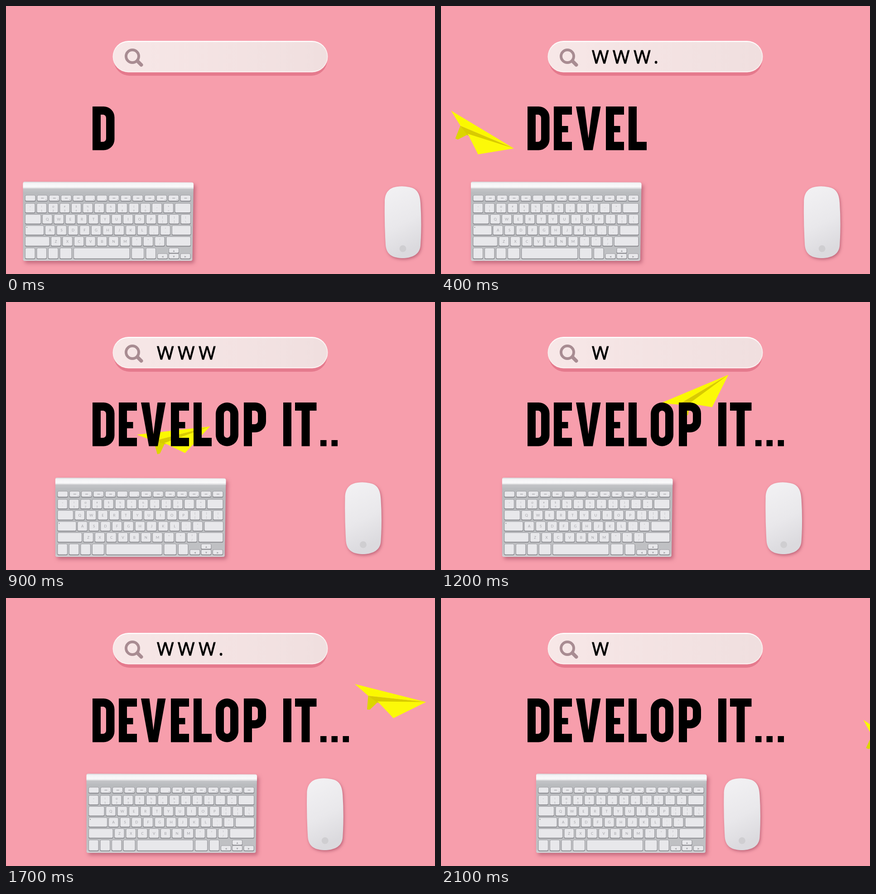
These frames come from a looping animation (947 px wide and 592 px high, 2200 ms). An HTML page:

```html
<!DOCTYPE html>
<html lang="en">
<head>
<meta charset="utf-8">
<title>Develop it</title>
<style>
  html, body { margin: 0; height: 100%; overflow: hidden; background: #f79eac; }
  svg { display: block; width: 100vw; height: 100vh; }
  #url { font: 40.5px "Open Sans", "Noto Sans", sans-serif; letter-spacing: 8.6px; stroke: #000; }
  #keyboard text { font: 8px Lato, "Open Sans", sans-serif; fill: #a3a3a8; text-anchor: middle; }
  #keyboard text.small { font-size: 6px; }
  #keyboard .key { fill: #e8e8eb; stroke: #97979c; stroke-width: .9; }
  #keyboard .under { fill: #838388; }
  #keyboard { filter: drop-shadow(4px 5px 4px rgba(140, 50, 75, .5)); }
  #mouse { filter: drop-shadow(2px 3px 3px rgba(140, 50, 75, .5)); }
</style>
</head>
<body>
<svg viewBox="0 0 947 592">
  <defs>
    <linearGradient id="pill">
      <stop stop-color="#f7e7e7"/><stop offset="1" stop-color="#f0dfdf"/>
    </linearGradient>
    <linearGradient id="rim" x2="0" y2="1">
      <stop stop-color="#fff"/><stop offset=".3" stop-color="#faeeee"/>
      <stop offset=".85" stop-color="#f8eaea"/><stop offset="1" stop-color="#fdf0f0"/>
    </linearGradient>
    <linearGradient id="body" x2="0" y2="1">
      <stop stop-color="#cfd0d3"/><stop offset=".12" stop-color="#b9bbbe"/>
      <stop offset=".95" stop-color="#c0c1c4"/><stop offset="1" stop-color="#d4d4d7"/>
    </linearGradient>
    <linearGradient id="roll" x2="0" y2="1">
      <stop stop-color="#d3d2d5"/><stop offset=".2" stop-color="#f3f3f5"/>
      <stop offset=".7" stop-color="#fafafb"/><stop offset="1" stop-color="#d4d4d7"/>
    </linearGradient>
    <linearGradient id="shell" x2=".25" y2="1">
      <stop stop-color="#f3f2f4"/><stop offset=".6" stop-color="#e9e8eb"/><stop offset="1" stop-color="#dbdade"/>
    </linearGradient>
  </defs>

  <rect x="238" y="84" width="471" height="70" rx="35" fill="#e57a8d"/>
  <rect x="235.5" y="77" width="475" height="69.5" rx="34.7" fill="url(#rim)"/>
  <rect x="237.5" y="79.5" width="471" height="64.5" rx="32.2" fill="url(#pill)"/>
  <g fill="none" stroke="#a88c92">
    <circle cx="279" cy="111" r="14" stroke-width="6"/>
    <path d="M290.5 122l8 8" stroke-width="8" stroke-linecap="round"/>
  </g>
  <text id="url" x="333" y="126.5"></text>

  <g id="plane">
    <path d="M35 18L61 23 46 47 40 48z" fill="#ddd500"/>
    <path d="M59 22L162 0 101 52z" fill="#fcf908"/>
    <path d="M35 18L162 0 60 28z" fill="#d8cb00"/>
    <path d="M0 0L162 0 35 18z" fill="#fbf800"/>
    <path d="M58 25L162 0 101 52z" fill="#fcf908"/>
  </g>
  <g id="title" role="img" aria-label="DEVELOP IT..." fill-rule="evenodd"></g>

  <g id="keyboard">
    <path d="M0 5H376.500L374 171q0 4-4 4H4q-4 0-4-4z" fill="url(#body)"/>
    <path d="M0 15V4q0-4 4-4L372 1.500q4.500 0 4.500 4V16z" fill="url(#roll)"/>
  </g>
  <g id="mouse">
    <path d="M0 35C0 14 10 3 28 1Q40-1 54 2C71 5 78 16 79 38Q82 85 79 130C78 150 62 158 42 159C18 159 4 152 2 130Q-1 80 0 35Z" fill="url(#shell)"/>
    <circle cx="40" cy="138" r="7.500" fill="#cfced1"/>
  </g>
</svg>
<script>
const $ = id => document.getElementById(id);

function add(parent, tag, attrs, text = '') {
  const el = document.createElementNS('http://www.w3.org/2000/svg', tag);
  for (const name in attrs) el.setAttribute(name, attrs[name]);
  el.textContent = text;
  return parent.appendChild(el);
}

// Headline letters
const letterE = x => `M${x} 222h40v18h-22v25h13.500v14h-13.500v21h22v18.500h-40z`;
const dot = x => `M${x} 305h13.500v13.500h-13.500z`;
const letters = [
  'M191 222h24.500a24 24 0 0 1 24 24v48.500a24 24 0 0 1-24 24h-24.500zM209 240v60h5a7 7 0 0 0 7-7v-46a7 7 0 0 0-7-7z',
  letterE(249),
  'M298 222h18.500l9 70 9-70h18l-17.500 96.500h-19.500z',
  letterE(364),
  'M414 222h18v78h22v18.500h-40z',
  'M463 247a25 25 0 0 1 50 0v46.500a25 25 0 0 1-50 0zM481 247v46a7 7 0 0 0 14 0v-46a7 7 0 0 0-14 0z',
  'M525 222h25a24 24 0 0 1 24 24v18a24 24 0 0 1-24 24h-7v30.500h-18zM543 240v30h6a7 7 0 0 0 7-7v-16a7 7 0 0 0-7-7z',
  'M612 222h18v96.500h-18z',
  'M638 222h47.500v18h-15v78.500h-18v-78.500h-14.500z',
  dot(694), dot(718.5), dot(743.5)
].map(d => add($('title'), 'path', { d }));

// Keyboard, in coordinates relative to its top left corner
function key(x, y, width, height, label = '', shifted = '') {
  const board = $('keyboard'), mid = x + width / 2;
  add(board, 'rect', { class: 'under', x: x - .5, y: y + .5, width: width + 1, height: height + 1, rx: 3 });
  add(board, 'rect', { class: 'key', x, y, width, height, rx: 2.7 });
  if (shifted) {
    add(board, 'text', { class: 'small', x: mid, y: y + 8.5 }, shifted);
    add(board, 'text', { class: 'small', x: mid, y: y + 17.5 }, label);
  } else if (label) add(board, 'text', { x: mid, y: y + height / 2 + 3 }, label);
}

function row(y, x, labels, shifted = '') {
  const skip = labels.length - shifted.length;
  [...labels].forEach((c, i) => key(x + i * 25.45, y, 21.5, 20.5, c, shifted[i - skip]));
}

for (let i = 0; i < 14; i++) {
  const x = 5 + i * 26.35;
  key(x, 30, 22.5, 12.5);
  if (i && i != 5 && i != 6) add($('keyboard'), 'rect', { x: x + 8.5, y: 35.5, width: 6, height: 2, fill: '#b9b9bd' });
  if (i && i < 13) add($('keyboard'), 'rect', { x: x + 18.5, y: 39, width: 1.5, height: 1.5, fill: '#aaaaae' });
}
row(48, 5, '`1234567890-=', '~!@#$%^&*()_+');
key(335.5, 48, 34.5, 20.5);
key(5, 72.5, 34.5, 20.5);
row(72.5, 43, 'QWERTYUIOP[]\\', '{}|');
key(5, 97, 41, 20.5);
row(97, 49, "ASDFGHJKL;'", ':"');
key(329, 97, 41.5, 20.5);
key(5, 121.5, 53.5, 20.5);
row(121.5, 62, 'ZXCVBNM,./', '<>?');
key(316.5, 121.5, 53.5, 20.5);
add($('keyboard'), 'circle', { cx: 8.5, cy: 101, r: .9, fill: '#777' });
for (const [x, w] of [[5, 21.5], [30.5, 21.5], [56, 21.5], [81.5, 26], [112, 123.5], [240, 27], [271.5, 21.5]])
  key(x, 146.5, w, 23.5);
for (const [x, y, label] of [[297, 159, '◂'], [322, 146.5, '▴'], [322, 159, '▾'], [347.5, 159, '▸']])
  key(x, y, 22, 11, label);

// time, plane x, y, heading in degrees, speed per ms, progress of the devices
const stops = [
  [0, -138, 125, 36, .5, 0],
  [400, 22, 231, 31, .45, .165],
  [600, 101, 280, 19, .54, .25],
  [900, 289, 293, -6.4, .64, .414],
  [1400, 611, 189, -1.8, .6, .665],
  [1700, 770, 190, 14.2, .46, .812],
  [2100, 932, 269, 34, .4, 1]
];

// Hermite curve: value and slope at u
function curve(a, b, m, n, u) {
  const c = 3 * (b - a) - 2 * m - n, d = 2 * (a - b) + m + n;
  return [a + u * (m + u * (c + u * d)), m + u * (2 * c + 3 * u * d)];
}

const place = (id, x, y, angle = 0) =>
  $(id).setAttribute('transform', `translate(${x} ${y}) rotate(${angle})`);

function draw(now) {
  const step = Math.floor(now / 100) % 22, t = step * 100;

  const i = Math.max(1, stops.findIndex(s => s[0] >= t));
  const [t0, x0, y0, a0, v0, p0] = stops[i - 1], [t1, x1, y1, a1, v1, p1] = stops[i];
  const span = t1 - t0, u = (t - t0) / span, rad = Math.PI / 180;
  const [x, dx] = curve(x0, x1, v0 * span * Math.cos(a0 * rad), v1 * span * Math.cos(a1 * rad), u);
  const [y, dy] = curve(y0, y1, v0 * span * Math.sin(a0 * rad), v1 * span * Math.sin(a1 * rad), u);
  place('plane', x, y, Math.atan2(dy, dx) / rad);

  const p = p0 + (p1 - p0) * u;
  place('keyboard', 37.5 + 172.5 * p, 388);
  place('mouse', 836 - 211.5 * p, 398);

  // The address is typed and erased twice per loop
  const k = step % 11;
  $('url').textContent = 'WWW.'.slice(0, Math.floor(1.5 * Math.min(k, 11 - k)));
  const shown = Math.floor(1 + 1.12 * step);
  letters.forEach((el, n) => el.style.display = n < shown ? '' : 'none');
}

const start = performance.now();
(function tick() {
  draw(performance.now() - start);
  requestAnimationFrame(tick);
})();
</script>
</body>
</html>
```
